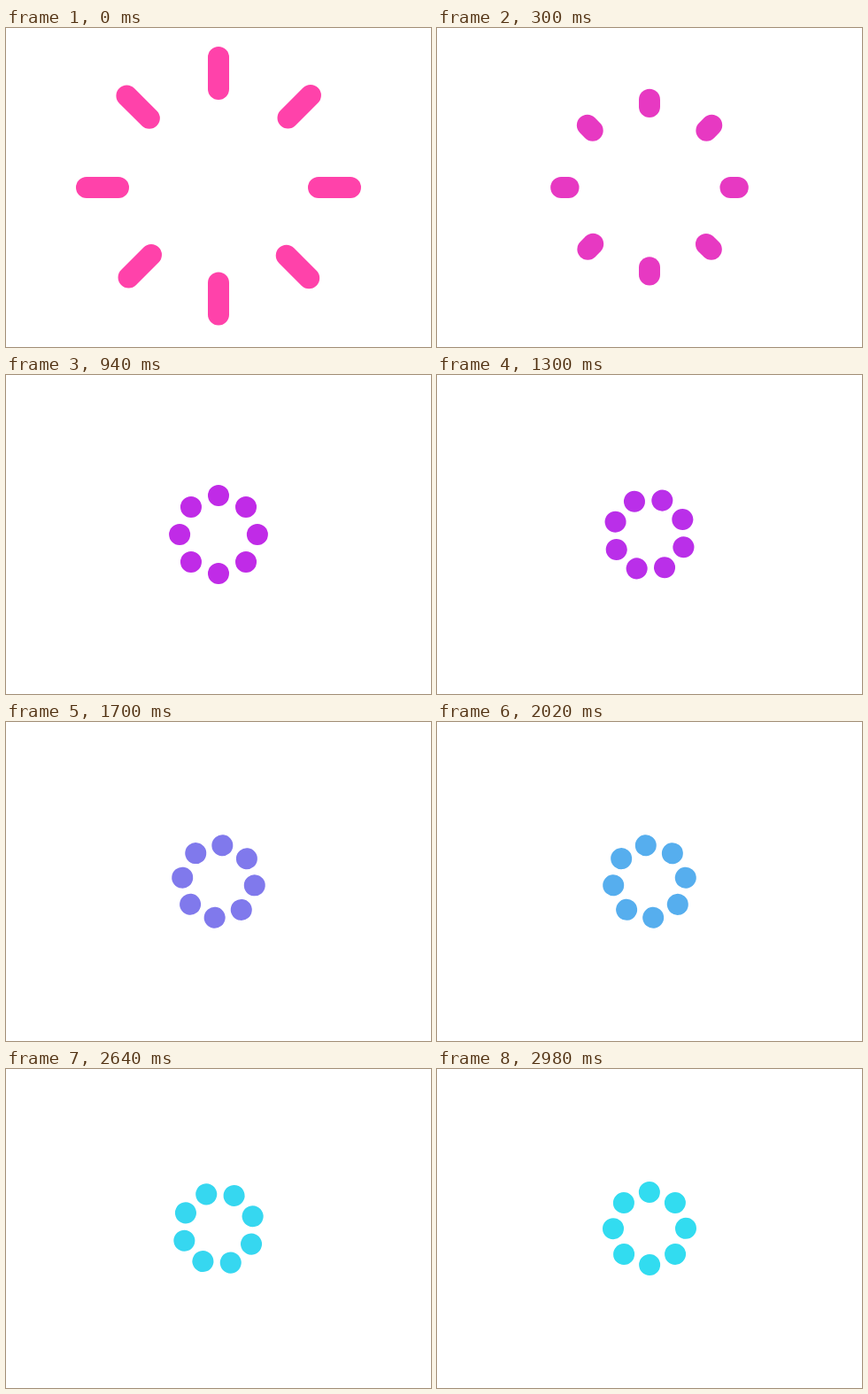
An HTML page with a canvas that plays this animation: 480 by 360 pixels, repeating every 3 s.

```html
<!DOCTYPE html>
<html>
<head>
<meta charset="utf-8">
<style>
html, body { margin: 0; width: 100%; height: 100%; overflow: hidden; background: #fff; }
canvas { display: block; }
</style>
</head>
<body>
<canvas width="480" height="360"></canvas>
<script>
const ctx = document.querySelector('canvas').getContext('2d');
const LOOP = 3000, LAG = 20, GATHER = 1200, SHRINK = 600;
const PINK = [255, 66, 170], PURPLE = [190, 42, 233], CYAN = [50, 220, 240];
// Small start offsets of the spokes, clockwise from the top
const OFFSETS = [2.5, 2.5, 4.5, 0, -1, -1, 4.5, 2];

// cubic-bezier(.25, .1, .25, 1)
function ease(x) {
  if (x <= 0) return 0;
  if (x >= 1) return 1;
  let lo = 0, hi = 1, s;
  for (let i = 0; i < 30; i++) {
    s = (lo + hi) / 2;
    if (0.75 * s * (1 - s) + s ** 3 < x) lo = s; else hi = s;
  }
  return 0.3 * s * (1 - s) ** 2 + 3 * s * s * (1 - s) + s ** 3;
}

const mix = (a, b, k) => a.map((v, i) => Math.round(v + (b[i] - v) * k));

function draw(time) {
  const t = Math.max(0, time % LOOP - LAG);
  const gather = ease(t / GATHER);
  const spin = ease((t - GATHER) / (LOOP - GATHER));
  const stretch = 1 - ease(t / SHRINK);
  const color = t < GATHER ? mix(PINK, PURPLE, gather) : mix(PURPLE, CYAN, spin);

  ctx.clearRect(0, 0, 480, 360);
  ctx.strokeStyle = `rgb(${color})`;
  ctx.lineWidth = 24;
  ctx.lineCap = 'round';
  OFFSETS.forEach((offset, i) => {
    const dist = 41 + 85.5 * (1 - gather) + offset * stretch;
    const half = Math.max(0.01, 18 * stretch);
    ctx.save();
    ctx.translate(240, 180);
    ctx.rotate(i * Math.PI / 4 + spin * 4 * Math.PI);
    ctx.beginPath();
    ctx.moveTo(0, -dist - half);
    ctx.lineTo(0, -dist + half);
    ctx.stroke();
    ctx.restore();
  });
}

function tick() {
  draw(performance.now());
  requestAnimationFrame(tick);
}
tick();
</script>
</body>
</html>
```
